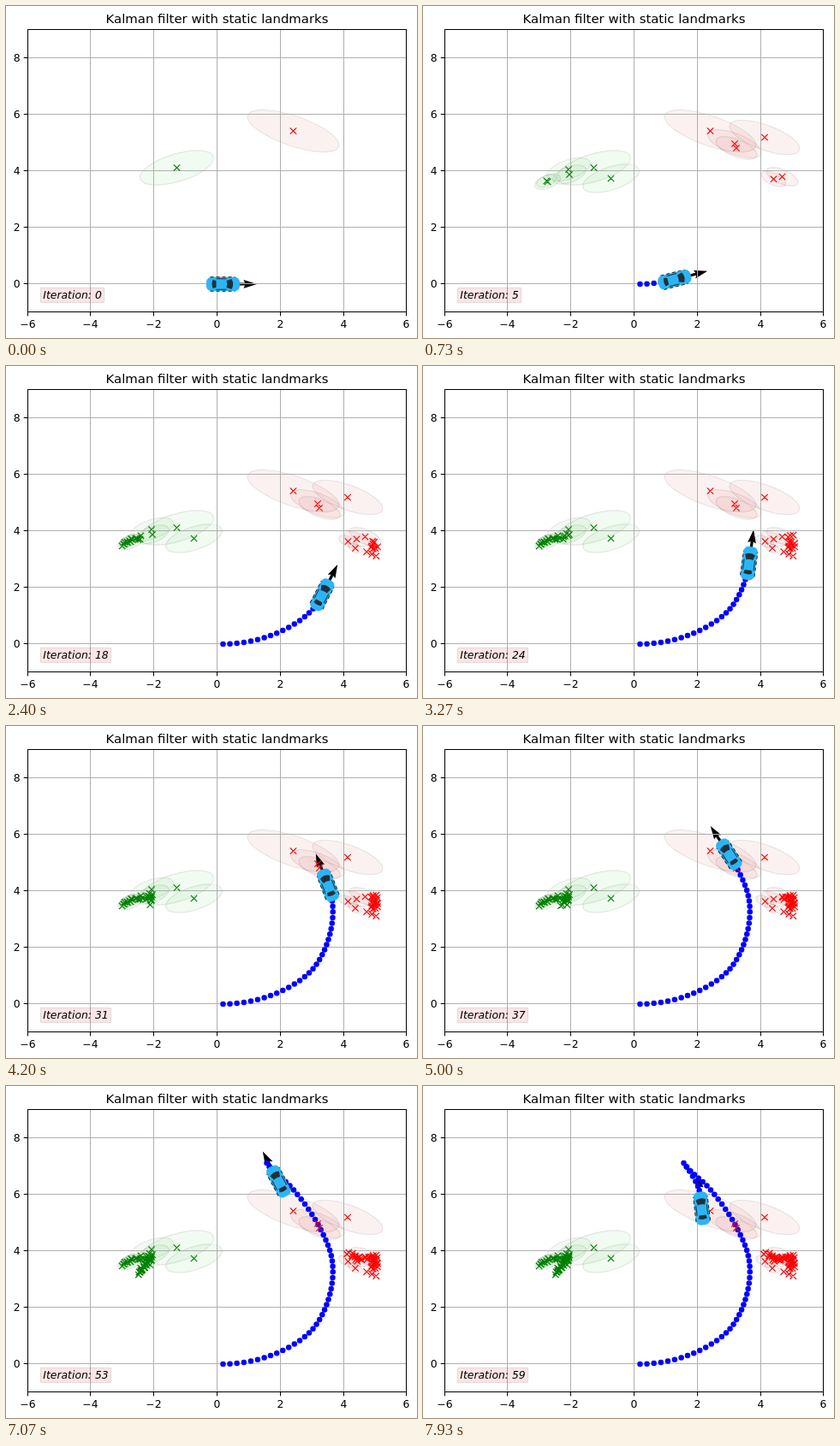
Animation of 480 by 388 pixels, one loop 8000 ms. Source, as an HTML page:

```html
<!DOCTYPE html>
<html lang="en">
<head>
<meta charset="utf-8">
<title>Kalman filter</title>
<style>
html, body { margin: 0; width: 100%; height: 100%; overflow: hidden; background: #fff; }
svg { display: block; width: 480px; height: 388px; font: 12.4px "DejaVu Sans", sans-serif; }
</style>
</head>
<body>
<svg viewBox="0 0 480 388">
  <g id="ellipses" fill-opacity=".055" stroke="#000" stroke-opacity=".09" stroke-width="1.2"></g>
  <path id="arrow" d="M0-1.600H25.5L24-4.900L39.5 0L24 4.900L25.5 1.600H0Z"/>
  <path id="grid" stroke="#b0b0b0" fill="none"/>
  <g id="dots" fill="#00f"></g>
  <path id="green" stroke="#008000" stroke-width="1.2" fill="none"/>
  <path id="red" stroke="#f00" stroke-width="1.2" fill="none"/>
  <path id="ticks" stroke="#000" fill="none"/>
  <rect x="25.5" y="27.5" width="442" height="330" fill="none" stroke="#000"/>
  <g id="labels"></g>
  <text x="246.5" y="20.3" font-size="14.88" text-anchor="middle">Kalman filter with static landmarks</text>
  <rect id="box" x="40.5" y="329.5" height="17" fill="#d00" fill-opacity=".1" stroke="#000" stroke-opacity=".1"/>
  <text id="count" x="43.3" y="342" font-style="italic"></text>
  <g id="car">
    <rect x="-19.5" y="-8.300" width="39" height="16.6" rx="6" fill="#2cb5f5"/>
    <path d="M-15-8.300H14M-15 8.300H14" stroke="#123" stroke-dasharray="4 3"/>
    <path d="M-12-5Q-14 0-12 5L-8 4V-4ZM4-4L10-6Q13.5 0 10 6L4 4Q5.500 0 4-4Z" fill="#20303a"/>
    <path d="M-8-6.300H4M-8 6.300H4" stroke="#20303a"/>
  </g>
</svg>
<script>
const $ = id => document.getElementById(id);
const snap = v => Math.floor(v) + .5;
const X = x => snap(246.5 + 36.9 * x), Y = y => snap(324.9 - 33.06 * y);
const noise = k => { const s = Math.sin(k * 127.1) * 43758.5453; return (s - Math.floor(s)) * 2 - 1; };

// Catmull-Rom curve; the first and last keys only steer the ends
const spline = (keys, u) => {
  const i = Math.max(0, Math.min(keys.length - 4, Math.floor(u))), t = u - i;
  return [0, 1].map(k => {
    const [a, b, c, d] = keys.slice(i, i + 4).map(p => p[k]);
    return b + t / 2 * (c - a + t * (2 * a - 5 * b + 4 * c - d + t * (3 * (b - c) + d - a)));
  });
};

// The car drives forward until the turning iteration, then reverses
const TURN = 49, LAST = 59;
const ahead = [[198,315], [253.5,325], [309,315], [354,288.5], [376.5,249.5],
  [381,204.5], [364.5,162], [336,121.5], [304.5,90], [290,50]];
const back = [[295,80], [304.5,90], [321,117], [325.5,143], [327,168]];
const place = n => n <= TURN ? spline(ahead, n / 7) : spline(back, (n - TURN) / 5);
const heading = n => {
  const e = n <= TURN ? -.01 : .01;
  const [x, y] = place(n), [p, q] = place(n + e);
  return n <= TURN ? Math.atan2(y - q, x - p) : Math.atan2(y - q, x - p);
};

// Sightings: count, start and end of a line, scatter
const cluster = ([n, x1, y1, x2, y2, r]) => Array.from({length: n}, (_, i) => {
  const u = i / (n - 1), k = i + x1 + y2;
  return [x1 + (x2 - x1) * u + r * noise(k), y1 + (y2 - y1) * u + r * noise(k + 50)];
});
const landmarks = [
  {id: "green", fill: "#0b0", a: 44.6, b: 16.1, tilt: -17, seen: [
    [2,199.5,189,219.5,201.5,0], [2,170,191,171,197,0], [8,145,204,136,209,1.5],
    [13,148,203,170,198,3], [7,170,198,166,206,3], [12,168,202,155,220,1.5], [16,156,218,170,199,2]
  ].flatMap(cluster)},
  {id: "red", fill: "#c00", a: 56, b: 17.4, tilt: 19, seen: [
    [2,335.5,146,399,153.5,0], [2,364,161,366,166,0], [3,419.5,199.5,399.5,205,0],
    [2,408,213,426.5,212,0], [3,422,217,432,223,1], [13,431,212,430,200,4],
    [7,431,199,431,207,3], [12,430,200,407,203,2.5], [16,400,195,422,205,2.5]
  ].flatMap(cluster)}
];

// Uncertainty shrinks with each sighting
const oval = ({fill, a, b, tilt}, [x, y], i) =>
  `<ellipse rx="${a * .77 ** i}" ry="${b * .83 ** i}" fill="${fill}"
    transform="translate(${x} ${y}) rotate(${tilt + i * Math.sign(tilt)})"/>`;
const cross = ([x, y]) => `M${x - 3.7} ${y - 3.7}l7.4 7.4m0 -7.4l-7.4 7.4`;
const dot = ([x, y]) => `<circle cx="${x}" cy="${y}" r="3.25"/>`;

let grid = "", ticks = "", labels = "";
for (let v = -6; v <= 6; v += 2) {
  grid += `M${X(v)} 27.5V357.5`;
  ticks += `M${X(v)} 357.5v4.8`;
  labels += `<text x="${X(v)}" y="375.7" text-anchor="middle">${String(v).replace("-", "\u2212")}</text>`;
}
for (let v = 0; v <= 8; v += 2) {
  grid += `M25.5 ${Y(v)}H467.5`;
  ticks += `M25.5 ${Y(v)}h-4.8`;
  labels += `<text x="16.6" y="${Y(v) + 4.8}" text-anchor="end">${v}</text>`;
}
$("grid").setAttribute("d", grid);
$("ticks").setAttribute("d", ticks);
$("labels").innerHTML = labels;

const path = Array.from({length: LAST + 1}, (_, n) => place(n));

function draw(n) {
  for (const m of landmarks)
    $(m.id).setAttribute("d", m.seen.slice(0, n + 1).map(cross).join(""));
  $("ellipses").innerHTML = landmarks.flatMap(m =>
    m.seen.slice(0, Math.min(n + 1, 8)).map((p, i) => oval(m, p, i))).join("");
  $("dots").innerHTML = path.slice(0, n + 1).map(dot).join("");
  const pose = `translate(${path[n]}) rotate(${heading(n) * 180 / Math.PI})`;
  $("car").setAttribute("transform", pose);
  $("arrow").setAttribute("transform", pose);
  $("count").textContent = "Iteration: " + n;
  $("box").setAttribute("width", n < 10 ? 74 : 82);
}

let shown = -1;
function tick() {
  // three iterations every 400 ms, on 10 ms ticks
  const t = performance.now() % 8000, r = t % 400;
  const n = Math.floor(t / 400) * 3 + (r >= 130) + (r >= 270);
  if (n !== shown) draw(shown = n);
  requestAnimationFrame(tick);
}
tick();
</script>
</body>
</html>
```
